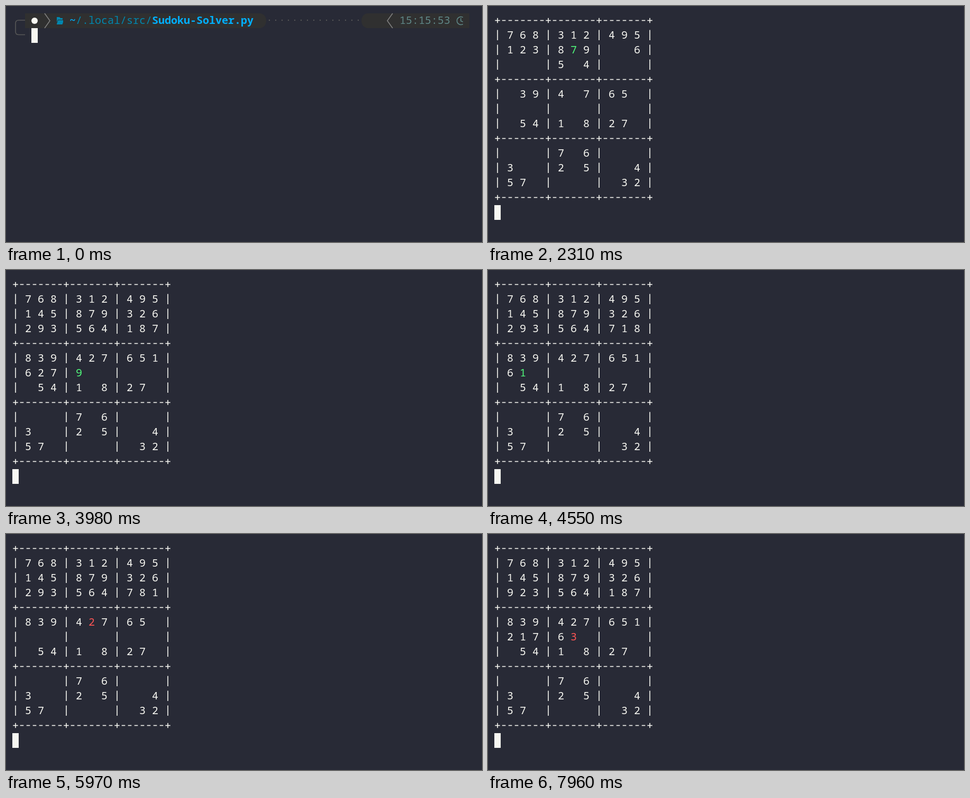
Animation, 900 px wide and 448 px high, one loop 8000 ms. Source, as an HTML page with a canvas:

```html
<!DOCTYPE html>
<html lang="en">
<head>
<meta charset="utf-8">
<title>Sudoku solver in a terminal</title>
<style>
html, body { margin: 0; height: 100%; overflow: hidden; background: #282a36; }
canvas { display: block; }
</style>
</head>
<body>
<canvas id="stage" width="900" height="448"></canvas>
<script>
const ctx = document.getElementById('stage').getContext('2d');
const LOOP = 8000, CELL = 12, LINE = 28;
const BG = '#282a36', FG = '#f8f8f2', GREEN = '#50fa7b', RED = '#ff5555';
const BAR = '#303030', GREY = '#585858', CHEVRON = '#808080';
const BLUE = '#00afff', TEAL = '#0087af', MAUVE = '#8787af';
const LIME = '#5fd700', GOLD = '#d7af00', SAGE = '#5f8787';

const puzzle =
  '76.....95' + '1..8.9..6' + '...5.4...' +
  '.394.765.' + '.........' + '.541.827.' +
  '...7.6...' + '3..2.5..4' + '57.....32';

// Backtracking search; every placement and removal is one logged step.
const grid = [...puzzle].map(c => +c || 0);
const steps = [];

function fits(i, n) {
  const r = Math.floor(i / 9), c = i % 9;
  return grid.every((v, k) => {
    const y = Math.floor(k / 9), x = k % 9;
    const sameBox = Math.floor(y / 3) === Math.floor(r / 3) && Math.floor(x / 3) === Math.floor(c / 3);
    return v !== n || !(y === r || x === c || sameBox);
  });
}

function log(cell, color) {
  steps.push({ grid: grid.slice(), cell, color });
}

function solve() {
  const i = grid.indexOf(0);
  for (let n = 1; n <= 9 && steps.length < 300; n++) {
    if (!fits(i, n)) continue;
    grid[i] = n;
    log(i, GREEN);
    solve();
    log(i, RED);
    grid[i] = 0;
  }
}
solve();

const rowTop = row => 14 + row * LINE;

function rect(x, y, w, h, color) {
  ctx.fillStyle = color;
  ctx.fillRect(x, y, w, h);
}

function text(str, x, row, color, bold) {
  ctx.font = (bold ? 'bold ' : '') + '20px "Noto Sans Mono", "DejaVu Sans Mono", monospace';
  ctx.fillStyle = color;
  ctx.fillText(str, x, rowTop(row) + 20);
}

// Draws [string, color, bold] pieces one after another.
function spans(x, row, list) {
  for (const [str, color, bold] of list) {
    text(str, x, row, color, bold);
    x += str.length * CELL;
  }
}

function path(d, color, width = 1.6) {
  ctx.strokeStyle = color;
  ctx.lineWidth = width;
  ctx.stroke(new Path2D(d));
}

function fill(d, color) {
  ctx.fillStyle = color;
  ctx.fill(new Path2D(d));
}

function dot(x, y, r, color) {
  ctx.fillStyle = color;
  ctx.beginPath();
  ctx.arc(x, y, r, 0, 7);
  ctx.fill();
}

function cursor(x, row) {
  rect(x, rowTop(row), CELL, LINE, FG);
}

// Bar with one rounded end: on the right for dir 1, on the left for dir -1.
function segment(x, w, row, dir) {
  const y = rowTop(row), end = dir > 0 ? x + w : x;
  rect(x, y, w, LINE, BAR);
  ctx.beginPath();
  ctx.ellipse(end, y + 14, 12, 14, 0, -Math.PI / 2, Math.PI / 2, dir < 0);
  ctx.fill();
}

function drawPrompt(t) {
  path('M36 27H24Q18 27 18 33V48.5Q18 54.5 24 54.5H36', GREY);
  const late = t >= 500;
  segment(36, late ? 600 : 444, 0, 1);
  dot(54, 28, 6, FG);
  path('M73 14L83 28L73 42', CHEVRON);
  fill('M96 21H101L103 23H107V26H98L96 31Z M98.5 27H108V31L106.5 35H96V34Z', TEAL);
  const folder = ['Sudoku-Solver.py', BLUE, true];
  if (late) drawStatus(folder); else drawClock(folder);
}

function drawClock(folder) {
  spans(120, 0, [['~', BLUE, true], ['/.local/src/', TEAL], folder]);
  for (let x = 498; x < 672; x += CELL) dot(x, 27, 1.2, GREY);
  segment(684, 192, 0, -1);
  path('M731 14L721 28L731 42', CHEVRON);
  text('15:15:53', 744, 0, SAGE);
  path('M864 21.6A7.5 7.5 0 1 0 864 34.4M860 23V28.5L864 30', SAGE);
}

function drawStatus(folder) {
  spans(120, 0, [['~', BLUE, true], ['/', TEAL], ['.lo', MAUVE], ['/', TEAL],
    ['sr', MAUVE], ['/', TEAL], folder]);
  path('M433 14L443 28L433 42', CHEVRON);
  dot(462, 28, 6, LIME);
  for (const [x, y] of [[482.5, 22], [482.5, 34], [489.5, 23]])
    path(`M${x - 2} ${y}a2 2 0 1 0 4 0a2 2 0 1 0 -4 0`, LIME);
  path('M482.5 24V32M489.5 25Q489.5 28.5 482.5 29.5', LIME);
  spans(504, 0, [['main  4 ', LIME], ['?1', BLUE]]);
  segment(792, 84, 1, -1);
  text('29%', 804, 1, GOLD);
  rect(856, 47, 4.5, 2, GOLD);
  rect(853, 49, 10.5, 15.5, GOLD);
  rect(855, 51, 6.5, 7, BAR);
}

function drawCommand(t) {
  const typed = t < 950 ? 0 : Math.min(8, Math.floor((t - 950) / 72.8) + 1);
  spans(48, 1, [
    ['make'.slice(0, typed), typed < 4 ? RED : GREEN],
    [' run'.slice(0, Math.max(0, typed - 4)), FG]
  ]);
  if (t < 1920) cursor(48 + typed * CELL, 1);
  else cursor(12, 2);
}

function drawRule(row) {
  const y = rowTop(row) + 13.5;
  for (let i = 0; i < 25; i++) {
    const x = 18 + i * CELL, plus = i % 8 === 0, half = plus ? 4.7 : 3.3;
    rect(x - half, y - 0.8, half * 2, 1.6, FG);
    if (plus) rect(x - 0.8, y - 4.7, 1.6, 9.4, FG);
  }
}

function drawBoard({ grid, cell, color }) {
  for (let row = 0; row < 13; row++) {
    if (row % 4 === 0) drawRule(row);
    else for (let i = 0; i < 4; i++) rect(17.2 + i * 96, rowTop(row) + 3.5, 1.6, 19.5, FG);
  }
  grid.forEach((n, i) => {
    const r = Math.floor(i / 9), c = i % 9;
    if (n) text(n, 36 + c * 24 + Math.floor(c / 3) * 24, r + 1 + Math.floor(r / 3), i === cell ? color : FG);
  });
  cursor(12, 13);
}

// The screen refreshes every 40.68 ms, on a 10 ms clock, two solver steps at a time.
function stepAt(t) {
  const s = Math.floor((t - 2760) / 10) * 10;
  return 2 * (Math.ceil((s + 7.6) / 40.68) + 18);
}

function draw(t) {
  rect(0, 0, 900, 448, BG);
  const n = stepAt(t);
  if (n >= 2) {
    drawBoard(steps[n - 1]);
  } else {
    drawPrompt(t);
    drawCommand(t);
  }
}

const start = performance.now();
function loop() {
  draw((performance.now() - start) % LOOP);
  requestAnimationFrame(loop);
}
loop();
</script>
</body>
</html>
```
